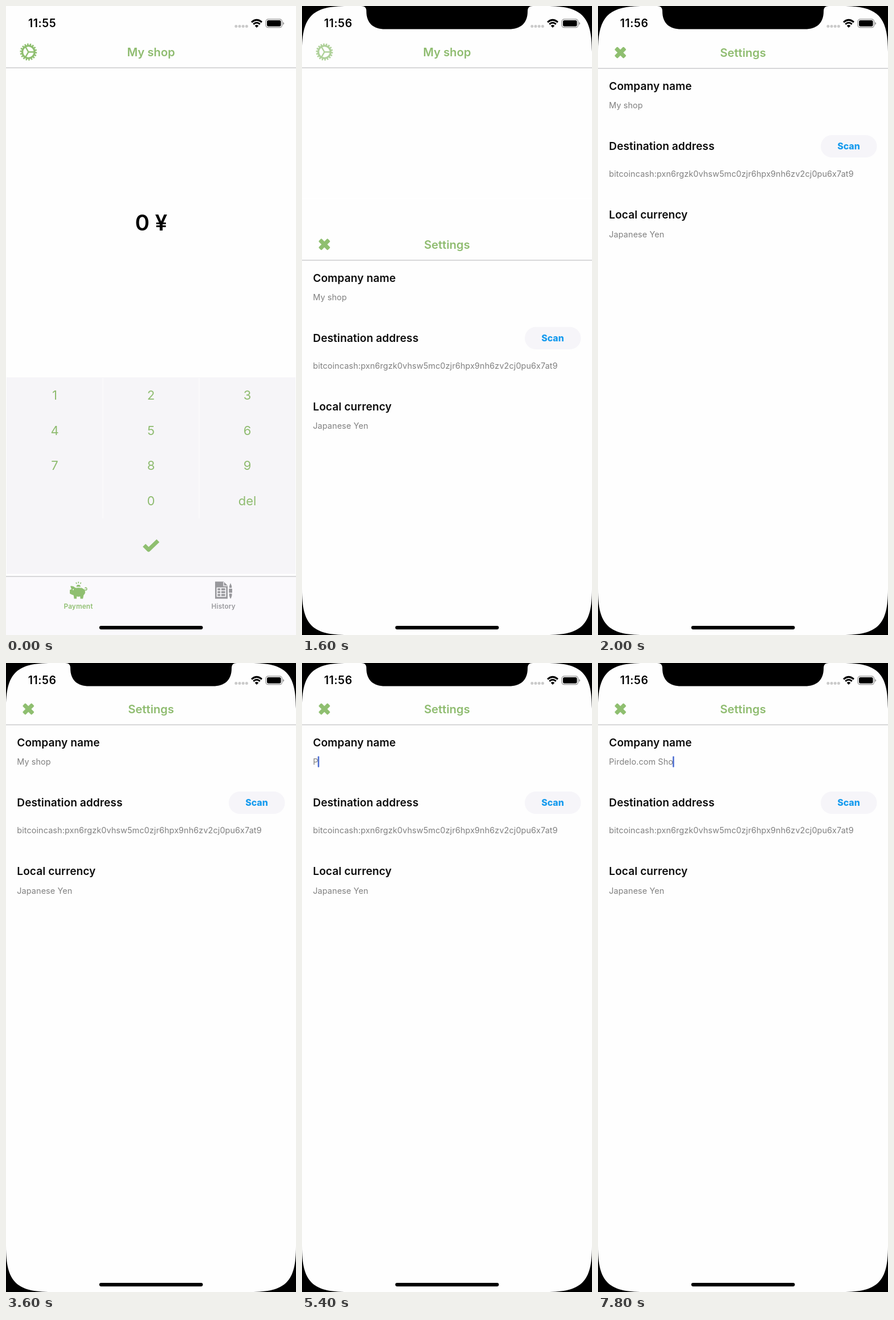
An HTML page for the animation above (8000 ms loop, 509x1101 px).

```html
<!DOCTYPE html>
<html lang="en">
<head>
<meta charset="utf-8">
<title>Shop settings</title>
<style>
  html, body { margin: 0; width: 100%; height: 100%; overflow: hidden; background: #fefefe; }
  svg { display: block; width: 509px; height: 1101px; }
  text { font-family: Inter, Roboto, sans-serif; white-space: pre; font-optical-sizing: none; }
  .mid { text-anchor: middle; }
  .title { font-size: 20.2px; font-weight: 600; fill: #8fbc70; }
  .label { font-size: 19.1px; font-weight: 600; letter-spacing: .06px; fill: #0c0c0c; }
  .value { font-size: 14.4px; letter-spacing: .1px; fill: #808080; }
  .key { font-size: 22px; fill: #8fbc70; }
  .tab { font-size: 11.7px; font-weight: 600; letter-spacing: .2px; }
  .clock { font-size: 19.4px; font-weight: 600; letter-spacing: .6px; }
  .green { fill: #8fbf70; }
  .stroke { fill: none; stroke: #8fbf70; }
</style>
</head>
<body>
<svg viewBox="0 0 509 1101">
  <rect width="509" height="1101" fill="#fefefe"/>

  <g id="home">
    <g id="gear" class="stroke" transform="translate(39.4 80.5)">
      <circle r="10.8" stroke-width="3.2"/>
      <circle r="13.3" stroke-width="3.2" pathLength="36" stroke-dasharray="1.1 .9"/>
      <path d="M0 0H10M0 0L-5 -8.7M0 0L-5 8.7" stroke-width="2.4"/>
    </g>
    <text class="title mid" x="254.5" y="88">My shop</text>
    <path d="M0 108.2H509" stroke="#cbcbcd" stroke-width="1.5"/>
    <text class="mid" x="254.8" y="393" font-size="38.5" font-weight="600">0 ¥</text>

    <rect x="1" y="650" width="507" height="344" fill="#f6f5f8"/>
    <path d="M170 651V897M339 651V897" stroke="#fbfafc" stroke-width="1.5"/>
    <g id="keys"></g>
    <path class="stroke" d="M242.5 944L250.3 951.8L266.8 936" stroke-width="7" stroke-linejoin="round"/>

    <rect y="998" width="509" height="103" fill="#faf9fc"/>
    <path d="M0 998.4H509" stroke="#cbcbcd" stroke-width="1.5"/>
    <g class="green">
      <ellipse cx="127" cy="1025.8" rx="12" ry="8.2"/>
      <path d="M113 1015.5Q119 1014.5 122 1019L117 1031L112 1028.5V1022L115 1021Z"/>
      <path d="M118.5 1030H124V1037.5H119.5ZM130 1030H136.5L135 1037.5H130.5Z"/>
      <path d="M123.6 1016.5a3.6 3.6 0 0 1 7.2 0Z"/>
    </g>
    <path class="stroke" d="M137.5 1022Q143 1023.5 141.5 1019Q139.5 1016.8 138.6 1019.5M123 1009L124 1011.5M127.2 1007.8V1010.5M131.5 1009L130.5 1011.5" stroke-width="1.6"/>
    <circle cx="118" cy="1021.5" r="1" fill="#faf9fc"/>
    <path d="M122.5 1018.3Q127 1016.8 132 1018.3" fill="none" stroke="#faf9fc" stroke-width="1.2"/>
    <text class="tab mid green" x="127" y="1054.7">Payment</text>

    <path d="M367 1007.5H382L389 1014.5V1037.5H367Z" fill="#98989c"/>
    <path d="M382 1008V1014.8H388.6" fill="none" stroke="#faf9fc" stroke-width="1.3"/>
    <path d="M370.5 1018.5H385.5V1033.5H370.5ZM370.5 1023.5H385.5M370.5 1028.5H385.5M377 1018.5V1033.5" fill="none" stroke="#faf9fc" stroke-width="1.7"/>
    <path d="M392 1015.5L394 1010L396.2 1015.5V1018.5H392ZM391.3 1020H397V1027H391.3ZM391.8 1028.5H396.5V1032L394.8 1037H393.5L391.8 1032Z" fill="#98989c"/>
    <text class="tab mid" x="381.7" y="1054.7" fill="#98989c">History</text>
  </g>

  <g id="sheet">
    <rect width="509" height="1101" fill="#fefefe"/>
    <g class="green" transform="translate(39.3 80.6)">
      <rect x="-11.2" y="-3.6" width="22.4" height="7.2" rx="1.4" transform="rotate(45)"/>
      <rect x="-11.2" y="-3.6" width="22.4" height="7.2" rx="1.4" transform="rotate(-45)"/>
    </g>
    <text class="title mid" x="254.5" y="88">Settings</text>
    <path d="M0 108.2H509" stroke="#cbcbcd" stroke-width="1.5"/>
    <text class="label" x="19.3" y="146.3">Company name</text>
    <text class="value" id="name" x="19.3" y="178.3"></text>
    <rect id="caret" y="163.2" width="2.5" height="19.4" rx="1" fill="#4a6bd0"/>
    <text class="label" x="19.3" y="251.3">Destination address</text>
    <rect x="391" y="225" width="98.5" height="39.3" rx="19.6" fill="#f6f5f9"/>
    <text class="mid" x="440" y="250.3" font-size="15.9" font-weight="800" fill="#179bee">Scan</text>
    <text class="value" x="19.3" y="298">bitcoincash:pxn6rgzk0vhsw5mc0zjr6hpx9nh6zv2cj0pu6x7at9</text>
    <text class="label" x="19.3" y="371.3">Local currency</text>
    <text class="value" x="19.3" y="403.7">Japanese Yen</text>
  </g>

  <text id="clock" class="clock mid" x="63.6" y="37.4"></text>
  <g fill="#cacaca">
    <circle cx="403.8" cy="35.4" r="2.5"/><circle cx="410" cy="35.4" r="2.5"/>
    <circle cx="416.2" cy="35.4" r="2.5"/><circle cx="422.4" cy="35.4" r="2.5"/>
  </g>
  <path d="M431 28.3Q440 20.4 449 28.3M434.2 31.8Q440 26.8 445.8 31.8" fill="none" stroke="#000" stroke-width="3"/>
  <path d="M436.6 34.6Q440 31.6 443.4 34.6L440 38Z"/>
  <rect x="456" y="23.1" width="28.6" height="14.6" rx="4.2" fill="none" stroke="#8c8c8c" stroke-width="1.2"/>
  <rect x="458" y="25.1" width="24.6" height="10.6" rx="2.6"/>
  <path d="M486.2 28a2.6 2.6 0 0 1 0 5Z" fill="#8c8c8c"/>
  <rect x="163.7" y="1085" width="181.8" height="6.2" rx="3.1"/>

  <g id="bezel">
    <path d="M104 0C110 0 113 3 113 9C113 30 125 40.5 146 40.5H363C384 40.5 396 30 396 9C396 3 399 0 405 0Z"/>
    <path d="M0 0H80C18 0 0 18 0 80ZM509 0H429C491 0 509 18 509 80ZM0 1101H80C18 1101 0 1083 0 1021ZM509 1101H429C491 1101 509 1083 509 1021Z"/>
  </g>
</svg>
<script>
const LOOP = 8000;
const OLD = "My shop", NEW = "Pirdelo.com Shop";
const $ = id => document.getElementById(id);
const nameText = $("name"), caret = $("caret"), sheet = $("sheet");

// [start time, value]
const slide = [[1600, 336.7], [1800, 19], [2000, 1], [3600, 0]];
const erase = [[4000, 7], [4200, 6], [4400, 4], [4600, 3], [4800, 1]];
const type = [[5400, 1], [5600, 2], [6000, 5], [6200, 6], [6400, 7], [6600, 8],
  [6800, 10], [7000, 11], [7400, 12], [7600, 13], [7800, 15]];

const at = (steps, t) => steps.reduce((v, [start, next]) => t >= start ? next : v, null);
const show = (el, on) => el.setAttribute("visibility", on ? "visible" : "hidden");

["1", "2", "3", "4", "5", "6", "7", "8", "9", "", "0", "del"].forEach((label, i) => {
  const key = document.createElementNS("http://www.w3.org/2000/svg", "text");
  key.setAttribute("class", "key mid");
  key.setAttribute("x", 85.5 + 169 * (i % 3));
  key.setAttribute("y", 689 + 61.5 * Math.floor(i / 3));
  key.textContent = label;
  $("keys").append(key);
});

function draw(t) {
  const y = at(slide, t);
  const open = y !== null;
  show(sheet, open);
  show($("bezel"), open);
  sheet.setAttribute("transform", `translate(0 ${y || 0})`);
  $("clock").textContent = t < 1400 ? "11:55" : "11:56";
  $("gear").setAttribute("opacity", t < 1400 ? 1 : 0.7);

  const typed = at(type, t);
  nameText.textContent = typed ? NEW.slice(0, typed) : OLD.slice(0, at(erase, t) ?? OLD.length);
  caret.setAttribute("x", 18.4 + nameText.getComputedTextLength());
  show(caret, t >= 4000);
}

const begin = performance.now();
function tick(now) {
  draw(Math.max(0, now - begin) % LOOP);
  requestAnimationFrame(tick);
}
draw(0);
requestAnimationFrame(tick);
</script>
</body>
</html>
```
